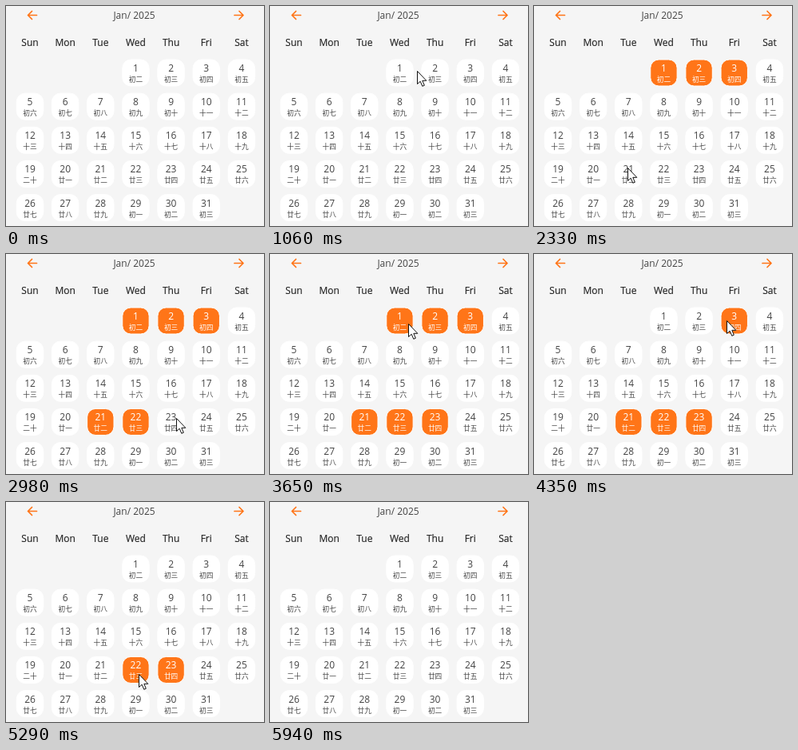
Animation, 323 px wide and 275 px high, one loop 6.47 s. Source, as an HTML page:

```html
<!DOCTYPE html>
<html lang="en">
<head>
<meta charset="utf-8">
<title>Calendar drag selection</title>
<style>
  html, body { margin: 0; width: 100%; height: 100%; overflow: hidden; background: #f5f5f5; }
  svg { display: block; width: 323px; height: 275px; }
  text { text-anchor: middle; font-family: "Open Sans", "Noto Sans", sans-serif; font-size: 12px; fill: #444; }
  .weekday { font-weight: 500; fill: #222; stroke: #222; stroke-width: .15px; }
  .day rect { fill: #fff; stroke: #fff; }
  .day .lunar { font-size: 8.7px; font-family: "Noto Sans CJK SC", "Noto Sans CJK", sans-serif; }
  .selected rect { fill: #ff7518; }
  .selected text { fill: #fff; }
  .arrow { fill: none; stroke: #ff7518; stroke-width: 1.7; stroke-linecap: round; stroke-linejoin: round; }
  #cursor { fill: #fff; stroke: #111; stroke-linejoin: round; }
</style>
</head>
<body>
<svg viewBox="0 0 323 275">
  <path class="arrow" d="M38.5 11.5h-11m5-5l-5 5l5 5"/>
  <path class="arrow" d="M286 11.5h11m-5-5l5 5l-5 5"/>
  <text x="160.5" y="16">Jan/ 2025</text>
  <g id="calendar"></g>
  <path id="cursor" d="M.5 .5V16.5L4.2 13.2L6.8 19.3L9.3 18.2L6.8 12.3H11.8Z"/>
</svg>
<script>
const LOOP = 6470;
const TOGGLE_GAP = 290;
const calendar = document.getElementById("calendar");
const cursor = document.getElementById("cursor");

function add(parent, tag, attributes, text = "") {
  const node = document.createElementNS("http://www.w3.org/2000/svg", tag);
  for (const name in attributes) node.setAttribute(name, attributes[name]);
  node.textContent = text;
  parent.append(node);
  return node;
}

function lunarName(day) {
  const n = day % 29 + 1;
  if (n === 20) return "二十";
  return (n <= 10 ? "初" : n < 20 ? "十" : "廿") + "十一二三四五六七八九"[n % 10];
}

const columnX = column => 30 + 44.15 * column;

["Sun", "Mon", "Tue", "Wed", "Thu", "Fri", "Sat"].forEach((name, i) =>
  add(calendar, "text", { class: "weekday", x: columnX(i), y: 49.5 }, name));

const days = [];
for (let day = 1; day <= 31; day++) {
  const slot = day + 2;
  const x = columnX(slot % 7);
  const y = 66.5 + 42.15 * Math.floor(slot / 7);
  const baseline = Math.round(y + 15.5);
  const cell = days[day] = add(calendar, "g", { class: "day" });
  add(cell, "rect", { x: x - 16.7, y: y + .5, width: 33.4, height: 33, rx: 10.5 });
  add(cell, "text", { x, y: baseline }, day);
  add(cell, "text", { class: "lunar", x, y: baseline + 13 }, lunarName(day));
}

// Each drag flips three days in a row.
const drags = [
  { day: 1, time: 1160 }, { day: 21, time: 2560 },
  { day: 1, time: 3970 }, { day: 21, time: 5240 }
];

// Turning points of the pointer: time, x, y
const path = [
  [410, 197, 183], [740, 147, 77], [930, 165, 80], [1210, 208, 83],
  [1620, 245, 86], [2010, 110, 190], [2330, 117, 202], [2660, 170, 206],
  [2950, 213, 206], [3650, 173, 87], [3790, 173, 87], [4350, 241, 83],
  [4790, 91, 218], [5290, 166, 215], [5760, 204, 213], [5940, 4, 262]
];

const ease = u => u * u * (3 - 2 * u);

function moveCursor(t) {
  const next = path.findIndex(point => point[0] > t);
  cursor.setAttribute("visibility", next > 0 ? "visible" : "hidden");
  if (next < 1) return;
  const [t0, x0, y0] = path[next - 1];
  const [t1, x1, y1] = path[next];
  const u = ease((t - t0) / (t1 - t0));
  const x = Math.round(x0 + (x1 - x0) * u);
  const y = Math.round(y0 + (y1 - y0) * u);
  cursor.setAttribute("transform", `translate(${x} ${y})`);
}

function isSelected(day, t) {
  const flips = drags.filter(drag => {
    const offset = day - drag.day;
    return offset >= 0 && offset < 3 && t >= drag.time + offset * TOGGLE_GAP;
  });
  return flips.length % 2 === 1;
}

function draw(now) {
  const t = now % LOOP;
  days.forEach((cell, day) => cell.classList.toggle("selected", isSelected(day, t)));
  moveCursor(t);
}

let origin;
function tick(now) {
  origin ??= now;
  draw(now - origin);
  requestAnimationFrame(tick);
}
draw(0);
requestAnimationFrame(tick);
</script>
</body>
</html>
```
